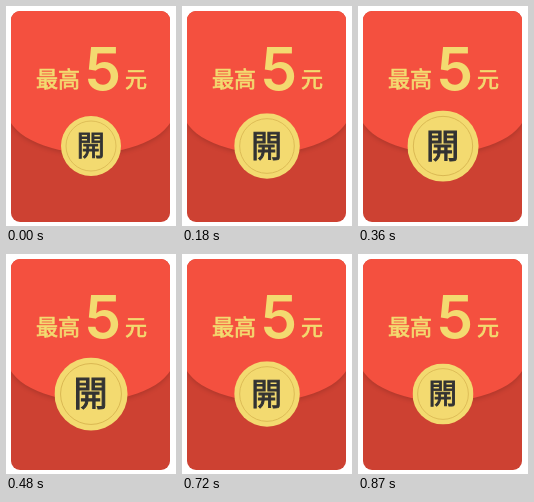
These frames come from a looping animation (170 px wide and 220 px high, 900 ms). An HTML page:

```html
<!DOCTYPE html>
<html lang="zh">
<head>
<meta charset="utf-8">
<style>
html, body { margin: 0; width: 100%; height: 100%; overflow: hidden; background: #fff; }
svg { display: block; width: 170px; height: 220px; }
text { font-family: "Noto Sans CJK SC", "Noto Sans CJK TC", sans-serif; font-weight: 400; text-anchor: middle; }
.label { fill: #f3da70; stroke: #f3da70; stroke-width: .7px; font-size: 22px; }
.amount { fill: #f3da70; font: 600 59px Inter, sans-serif; }
.open { fill: #333; stroke: #333; stroke-width: .9px; font-size: 28px; }
.flap { fill: #f4503f; filter: drop-shadow(0 2px 2px rgba(0, 0, 0, .14)); }
.coin { transform-origin: 85px 140px; animation: pulse 900ms infinite; }
@keyframes pulse {
  0%, 100% { transform: scale(1); animation-timing-function: steps(15); }
  50% { transform: scale(1.2333); animation-timing-function: steps(15); }
}
</style>
</head>
<body>
<svg viewBox="0 0 170 220">
  <clipPath id="card"><rect x="5" y="5" width="159" height="211" rx="9"/></clipPath>
  <g clip-path="url(#card)">
    <rect width="170" height="220" fill="#cd4132"/>
    <path class="flap" d="M.5 0H168.5V103A84 44 0 0 1 .5 103Z"/>
  </g>
  <text class="label" x="52" y="81">最高</text>
  <text class="amount" x="97" y="84">5</text>
  <text class="label" x="130" y="81">元</text>
  <g class="coin">
    <circle cx="85" cy="140" r="30" fill="#f3da70"/>
    <circle cx="85" cy="140" r="25" fill="none" stroke="#d9b752" stroke-width=".8"/>
    <text class="open" x="84.7" y="150">開</text>
  </g>
</svg>
</body>
</html>
```
